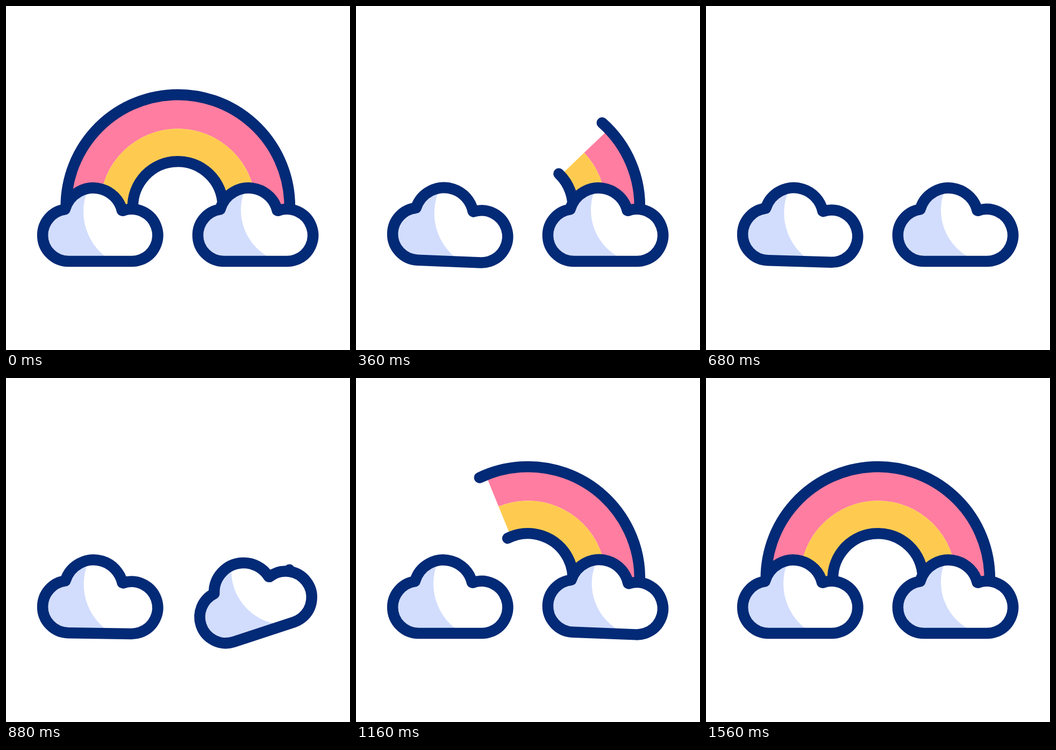
An HTML page with a canvas for the animation above (2 s loop, 640 px wide and 640 px high).

```html
<!DOCTYPE html>
<html lang="en">
<head>
<meta charset="utf-8">
<title>Rainbow</title>
<style>
  html, body { margin: 0; width: 100%; height: 100%; overflow: hidden; background: #fff; }
  canvas { display: block; width: 640px; height: 640px; }
</style>
</head>
<body>
<canvas id="stage" width="640" height="640"></canvas>
<script>
const ctx = document.getElementById('stage').getContext('2d');
const NAVY = '#032a76', PINK = '#ff7da0', YELLOW = '#fecb50', SHADE = '#d2ddfd';
const LOOP = 2000, STEP = 40, LINE = 20.5;
const CX = 319.8, CY = 373, OUTER = 208.1, MIDDLE = 144.7, INNER = 83.8;
const LEG = 10;
const CLOUD_GAP = 288.8, PIVOT_X = 175.5, PIVOT_Y = 425;

const rad = deg => deg * Math.PI / 180;
const clamp = u => Math.min(1, Math.max(0, u));
const smooth = u => u * u * (3 - 2 * u);
const rise = (t, from, to) => smooth(clamp((t - from) / (to - from)));

// Share of the rainbow that is hidden, counted from its left end
const hidden = t => rise(t, 10, 545) - rise(t, 810, 1400);

// A quick kick to the left, a small overshoot, then a slow return to rest
function tilt(t, life) {
  const kick = 19, overshoot = 2.4;
  const rest = clamp((t - 276) / (life - 276)) ** 2;
  return -kick * rise(t, 0, 100) + (kick + overshoot) * rise(t, 100, 276) - overshoot * rest;
}

function band(inner, outer, from, color) {
  ctx.beginPath();
  ctx.arc(CX, CY, outer, from, 2 * Math.PI);
  ctx.arc(CX, CY, inner, 2 * Math.PI, from, true);
  ctx.fillStyle = color;
  ctx.fill();
}

// Each rim runs a little past the half circle, behind the clouds
function rim(radius, cut) {
  const extra = LEG / radius;
  const from = Math.PI - extra + cut * (Math.PI + 2 * extra);
  ctx.beginPath();
  ctx.arc(CX, CY, radius, from, 2 * Math.PI + extra);
  ctx.stroke();
}

function rainbow(cut) {
  if (cut >= 1) return;
  const edge = rad(179.5 + 189 * cut);
  if (edge < 2 * Math.PI) {
    band(MIDDLE, OUTER, edge, PINK);
    band(INNER, MIDDLE, edge, YELLOW);
  }
  rim(OUTER, cut);
  rim(INNER, cut);
}

function cloudPath() {
  const path = new Path2D();
  const lobe = (x, y, r, x0, y0, x1, y1) =>
    path.arc(x, y, r, Math.atan2(y0 - y, x0 - x), Math.atan2(y1 - y, x1 - x));
  lobe(117.2, 427, 48.6, 117.2, 475.6, 110, 379);
  lobe(163, 394, 55, 110, 379, 217.3, 380.5);
  lobe(234.2, 427, 48.6, 217.3, 380.5, 234.2, 475.6);
  path.closePath();
  return path;
}
const CLOUD = cloudPath();

function cloud(offset, angle, light) {
  ctx.save();
  ctx.translate(offset + PIVOT_X - 0.5, PIVOT_Y - 0.5);
  ctx.rotate(rad(angle));
  ctx.translate(-PIVOT_X, -PIVOT_Y);
  ctx.fillStyle = SHADE;
  ctx.fill(CLOUD);
  ctx.save();
  ctx.clip(CLOUD);
  ctx.fillStyle = '#fff';
  ctx.beginPath();
  ctx.arc(light.x, light.y, light.r, 0, 2 * Math.PI);
  ctx.fill();
  ctx.fillRect(light.x, 320, 200, 160);
  ctx.restore();
  ctx.stroke(CLOUD);
  ctx.restore();
}

function draw(t) {
  ctx.fillStyle = '#fff';
  ctx.fillRect(0, 0, 640, 640);
  ctx.strokeStyle = NAVY;
  ctx.lineWidth = LINE;
  ctx.lineCap = ctx.lineJoin = 'round';
  rainbow(hidden(t));
  cloud(0, tilt(t, 1030), { x: 250.5, y: 383, r: 106 });
  cloud(CLOUD_GAP, tilt(t - 760, 800), { x: 248.7, y: 380, r: 100 });
}

const start = performance.now();
function tick() {
  const t = (performance.now() - start) % LOOP;
  draw(Math.floor(t / STEP) * STEP);
  requestAnimationFrame(tick);
}
tick();
</script>
</body>
</html>
```
